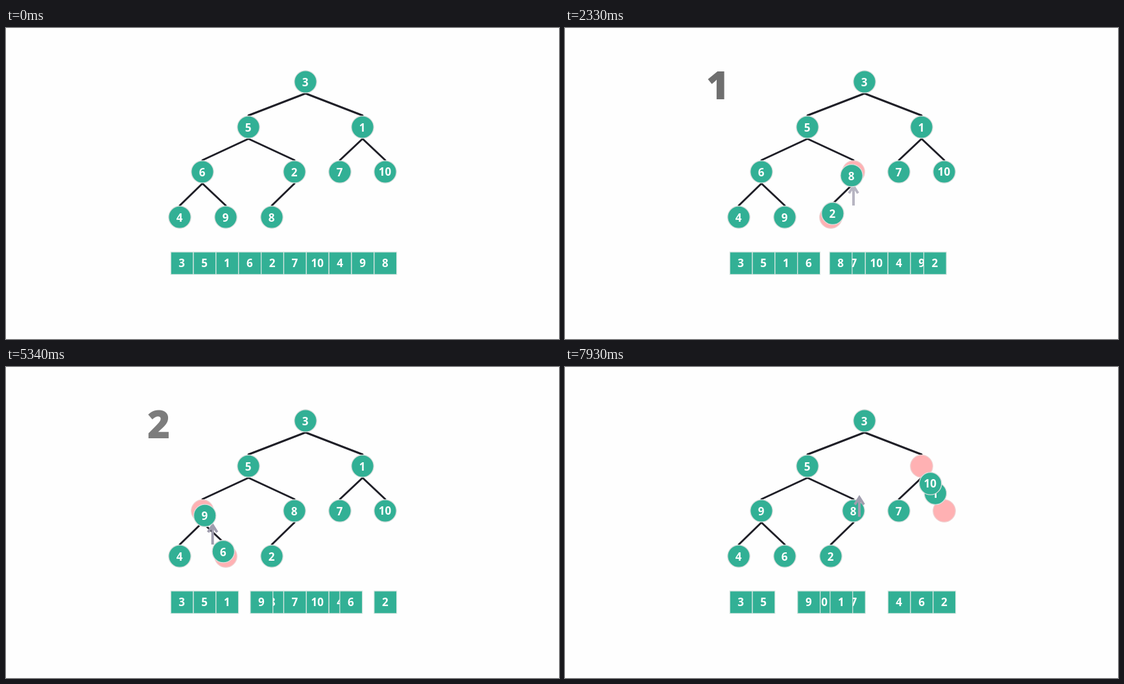
An HTML page with a canvas that plays this animation: 853x480 px, repeating every 7990 ms.

```html
<!DOCTYPE html>
<html lang="en">
<head>
<meta charset="utf-8">
<title>Heap building</title>
<style>
html, body { margin: 0; width: 100%; height: 100%; overflow: hidden; background: #fefefe; }
canvas { display: block; }
</style>
</head>
<body>
<canvas id="stage" width="853" height="480"></canvas>
<script>
const ctx = document.getElementById('stage').getContext('2d');
const LOOP = 7990, STEP = 60, STEPS = 30;
const GREEN = '#32b095', PINK = '#ffb1b3', RIM = '#d9dfdd', INK = '#1f1f27';
const DIGITS = 'bold 17px "Open Sans", "Noto Sans", sans-serif';
const NUMERAL = '800 60px "Open Sans", "Noto Sans", sans-serif';
const CELL = { x: 254.2, y: 345.8, w: 34.85, h: 34.6 };

// Tree slots in heap order
const slots = [[462, 83], [374, 153], [550, 153], [303, 222], [445, 222],
  [515, 222], [585, 222], [268, 292], [339, 292], [410, 292]];
const values = [3, 5, 1, 6, 2, 7, 10, 4, 9, 8];

// a, b: swapped slots; over: values whose cell stays above b's;
// topNode: which moving node is drawn last
const swaps = [
  { at: 1130, a: 4, b: 9, over: [], topNode: 'a', num: '1', arrow: [445, 241] },
  { at: 4200, a: 3, b: 8, over: [], topNode: 'b', num: '2', arrow: [304, 241] },
  { at: 7270, a: 2, b: 6, over: [9], topNode: 'b', num: '', arrow: [550, 171] }
];

const mix = (a, b, k) => a + (b - a) * k;
const clamp = v => Math.max(0, Math.min(1, v));

// Cubic curve through (.2, 0) and (.353, 1)
function ease(x) {
  let lo = 0, hi = 1;
  for (let i = 0; i < 24; i++) {
    const s = (lo + hi) / 2, r = 1 - s;
    if (0.6 * s * r * r + 1.059 * s * s * r + s * s * s < x) lo = s; else hi = s;
  }
  return lo * lo * (3 - 2 * lo);
}

function progress(t, start) {
  if (t < start) return 0;
  const n = Math.floor((t - start) / STEP) + 1;
  return n >= STEPS ? 1 : ease(n / STEPS);
}

function disc(x, y, r, fill, rim) {
  ctx.beginPath();
  ctx.arc(x, y, r, 0, Math.PI * 2);
  ctx.fillStyle = fill;
  ctx.fill();
  ctx.strokeStyle = rim;
  ctx.lineWidth = 1.3;
  ctx.stroke();
}

function label(value, x, y) {
  ctx.font = DIGITS;
  ctx.textAlign = 'center';
  ctx.fillStyle = '#fff';
  ctx.fillText(value, x, y);
}

function node(value, [x, y]) {
  disc(x, y, 17.2, GREEN, RIM);
  label(value, x - 0.5, y + (value === 10 ? 5.8 : 6.8));
}

function cell(value, pos) {
  const x = CELL.x + pos * CELL.w;
  ctx.fillStyle = GREEN;
  ctx.fillRect(x, CELL.y, CELL.w, CELL.h);
  ctx.strokeStyle = '#dbe8e3';
  ctx.lineWidth = 1.2;
  ctx.strokeRect(x, CELL.y, CELL.w, CELL.h);
  label(value, x + CELL.w / 2 - 0.4, 369);
}

function edges() {
  ctx.strokeStyle = INK;
  ctx.lineWidth = 3;
  ctx.lineCap = 'round';
  ctx.beginPath();
  for (let i = 1; i < slots.length; i++) {
    const [px, py] = slots[(i - 1) >> 1], [x, y] = slots[i];
    ctx.moveTo(px, py + 18);
    ctx.lineTo(x, y - 18);
  }
  ctx.stroke();
}

function arrow(x, y, alpha) {
  ctx.globalAlpha = alpha;
  ctx.strokeStyle = '#a09dae';
  ctx.lineWidth = 4;
  ctx.lineCap = 'butt';
  ctx.lineJoin = 'miter';
  ctx.beginPath();
  ctx.moveTo(x, y + 33);
  ctx.lineTo(x, y + 4);
  ctx.moveTo(x - 7, y + 14);
  ctx.lineTo(x, y + 3);
  ctx.lineTo(x + 7, y + 14);
  ctx.stroke();
  ctx.globalAlpha = 1;
}

function numeral(text, alpha) {
  if (!text || alpha <= 0) return;
  ctx.globalAlpha = alpha;
  ctx.font = NUMERAL;
  ctx.textAlign = 'left';
  ctx.fillStyle = '#404040';
  ctx.fillText(text, 218, 110);
  ctx.globalAlpha = 1;
}

function draw(t) {
  ctx.fillStyle = '#fefefe';
  ctx.fillRect(0, 0, 853, 480);

  // Apply finished swaps, find the running one
  const heap = values.slice();
  let move = null, last = -1, k = 0;
  swaps.forEach((s, i) => {
    const p = progress(t, s.at);
    if (p === 0) return;
    last = i;
    k = p;
    if (p === 1) [heap[s.a], heap[s.b]] = [heap[s.b], heap[s.a]];
    else move = s;
  });
  const moving = i => move && (i === move.a || i === move.b);

  edges();
  if (move) for (const i of [move.a, move.b]) disc(...slots[i], 17.2, PINK, '#efcfcf');
  heap.forEach((v, i) => { if (!moving(i)) node(v, slots[i]); });

  if (last >= 0) {
    const now = swaps[last], prev = swaps[last - 1];
    const fadeIn = clamp(3 * k - 2);
    if (prev) {
      arrow(mix(prev.arrow[0], now.arrow[0], k), mix(prev.arrow[1], now.arrow[1], k), 1);
      numeral(prev.num, 1 - 3 * k);
    } else if (fadeIn > 0) {
      arrow(...now.arrow, fadeIn);
    }
    numeral(now.num, fadeIn);
  }

  if (move) {
    const { a, b } = move;
    const along = (i, j) => slots[i].map((c, n) => mix(c, slots[j][n], k));
    const pair = [[heap[a], along(a, b)], [heap[b], along(b, a)]];
    if (move.topNode === 'a') pair.reverse();
    pair.forEach(p => node(...p));
  }

  heap.forEach((v, i) => { if (!moving(i)) cell(v, i); });
  if (move) {
    const { a, b } = move;
    cell(heap[b], mix(b, a, k));
    move.over.forEach(v => cell(v, heap.indexOf(v)));
    cell(heap[a], mix(a, b, k));
  }
}

const begin = performance.now();
function tick() {
  draw((performance.now() - begin) % LOOP);
  requestAnimationFrame(tick);
}
tick();
</script>
</body>
</html>
```
